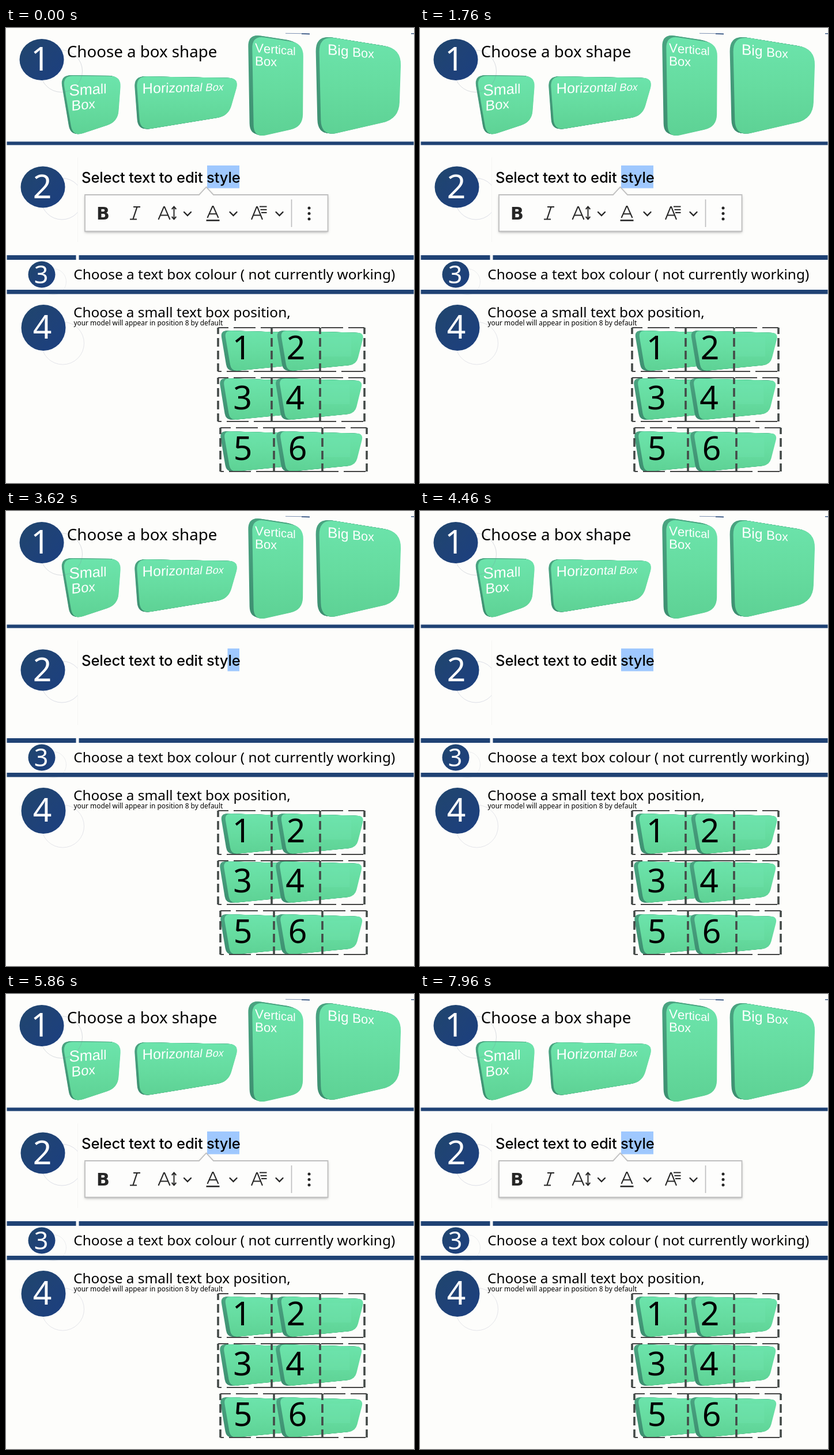
Write an HTML page with a canvas that moves like this. It is 708 px wide and 791 px high and loops after 8000 ms.

```html
<!DOCTYPE html>
<html lang="en">
<head>
<meta charset="utf-8">
<title>Box guide</title>
<style>
html, body { margin: 0; width: 100%; height: 100%; overflow: hidden; background: #fdfdfb; }
canvas { display: block; width: 708px; height: 791px; }
</style>
</head>
<body>
<canvas id="stage" width="708" height="791"></canvas>
<script>
const ctx = document.getElementById('stage').getContext('2d');
const LOOP = 8000;
const SANS = '"Noto Sans", "Open Sans", sans-serif';
const ARIAL = '"Liberation Sans", Arial, sans-serif';
const UI = 'Inter, sans-serif';
const HEAVY = '"DejaVu Sans", sans-serif';
const INK = '#262626';
const NAVY = '#1f4274';

// Editor timeline in ms
const TOOLBAR_OFF = 2600;
const TOOLBAR_ON = 5580;
const SELECT_START = 3440;
const SELECT_STEP = 160;

function text(str, x, y, size, { font = SANS, color = '#000', align = 'left', weight = 400, spacing = 0 } = {}) {
  ctx.font = `${weight} ${size}px ${font}`;
  ctx.letterSpacing = spacing + 'px';
  ctx.textAlign = align;
  ctx.fillStyle = color;
  ctx.fillText(str, x, y);
  ctx.letterSpacing = '0px';
}

function rect(x, y, w, h, color) {
  ctx.fillStyle = color;
  ctx.fillRect(x, y, w, h);
}

function line(points, color, width, cap = 'butt') {
  ctx.beginPath();
  points.forEach(([x, y]) => ctx.lineTo(x, y));
  ctx.strokeStyle = color;
  ctx.lineWidth = width;
  ctx.lineCap = cap;
  ctx.lineJoin = 'miter';
  ctx.stroke();
}

function dot(x, y, r) {
  ctx.beginPath();
  ctx.arc(x, y, r, 0, 7);
  ctx.fillStyle = INK;
  ctx.fill();
}

// Closed polygon with softened corners
function roundPoly(points, radius) {
  const n = points.length;
  ctx.beginPath();
  points.forEach((p, i) => {
    const a = points[(i + n - 1) % n], b = points[(i + 1) % n];
    const toward = q => {
      const k = radius / Math.hypot(q[0] - p[0], q[1] - p[1]);
      return [p[0] + (q[0] - p[0]) * k, p[1] + (q[1] - p[1]) * k];
    };
    ctx.lineTo(...toward(a));
    ctx.quadraticCurveTo(...p, ...toward(b));
  });
  ctx.closePath();
}

function solidBox(points, radius, dx, dy) {
  const ys = points.map(p => p[1]);
  const top = Math.min(...ys), bottom = Math.max(...ys);
  const side = ctx.createLinearGradient(0, top, 0, bottom);
  side.addColorStop(0, '#4aa481');
  side.addColorStop(1, '#3d8e70');
  for (let k = 1; k > 0; k -= 0.125) {
    roundPoly(points.map(([x, y]) => [x + dx * k, y + dy * k]), radius);
    ctx.fillStyle = side;
    ctx.fill();
  }
  const face = ctx.createLinearGradient(0, top, 0, bottom);
  face.addColorStop(0, '#6ce4ac');
  face.addColorStop(0.5, '#66dca0');
  face.addColorStop(1, '#5dd194');
  roundPoly(points, radius);
  ctx.fillStyle = face;
  ctx.fill();
}

// Letters shrink from one size to another along a sloped baseline
function receding(str, x, y, from, to, slope, skew = 0) {
  [...str].forEach((ch, i) => {
    const k = i / (str.length - 1);
    const size = from + (to - from) * k;
    ctx.save();
    ctx.transform(1, slope, skew * k, 1, x, y);
    text(ch, 0, 0, size, { font: ARIAL, color: '#fff' });
    const w = ctx.measureText(ch).width;
    ctx.restore();
    x += w;
    y += w * slope;
  });
}

function ring(x, y, r, color = '#d3d6e0') {
  ctx.beginPath();
  ctx.arc(x, y, r, 0, 7);
  ctx.strokeStyle = color;
  ctx.lineWidth = 0.8;
  ctx.stroke();
}

function badge(n, x, y, rx, ry, size, baseline, tx) {
  const g = ctx.createLinearGradient(x - rx, y - ry, x + rx, y + ry);
  g.addColorStop(0, '#20466c');
  g.addColorStop(0.5, '#1f4277');
  g.addColorStop(1, '#1b3f80');
  ctx.beginPath();
  ctx.ellipse(x, y, rx, ry, 0, 0, 7);
  ctx.fillStyle = g;
  ctx.fill();
  text(n, tx, baseline, size, { color: '#fff', align: 'center' });
}

function shapes() {
  text('Choose a box shape', 105.8, 51, 27.7);
  solidBox([[98, 83], [200, 84], [194, 163], [116, 189]], 19, -4, -1);
  receding('Small', 109.5, 118, 27.5, 23, -0.07);
  receding('Box', 113.5, 144, 25, 22.5, -0.12);

  solidBox([[226, 84], [405, 87], [386, 153], [233, 178]], 19, -4, 0);
  receding('Horizontal Box', 236.5, 114, 25.5, 17.5, -0.04, -0.22);

  solidBox([[427, 13], [516, 27], [515, 172], [430, 191]], 22, -7, -3);
  receding('Vertical', 432, 42, 22.5, 19.5, 0.075);
  receding('Box', 432, 65, 22.5, 21.5, 0.04);

  solidBox([[543, 13], [686, 36], [682, 158], [547, 189]], 29, -6, -1);
  receding('Big Box', 558, 46, 26, 21, 0.08);

  ring(96, 75, 36.5, 'rgba(120,130,150,.35)');
  badge('1', 62, 55, 38.5, 36, 57, 74, 59.5);

  line([[485, 9.3], [527, 9.8]], '#8093b4', 1);
  line([[513, 10.2], [527, 10.6]], NAVY, 1.3);
  line([[703, 9.8], [708, 9.8]], NAVY, 1.3);
}

function chevron(x) {
  line([[x - 6, 320], [x, 326], [x + 6, 320]], INK, 2.4, 'round');
}

function letterA(x, top, height, half = 10) {
  const bar = top + height * 0.66;
  line([[x - half, top + height], [x - 0.6, top], [x + 0.6, top], [x + half, top + height]], INK, 2);
  line([[x - half * 0.65, bar], [x + half * 0.65, bar]], INK, 2);
}

function toolbar() {
  ctx.save();
  ctx.beginPath();
  [[137, 290], [335, 290], [347.5, 276.5], [360, 290], [558.5, 290], [558.5, 353.5], [137, 353.5]]
    .forEach(p => ctx.lineTo(...p));
  ctx.closePath();
  ctx.shadowColor = 'rgba(0,0,0,.28)';
  ctx.shadowBlur = 4;
  ctx.shadowOffsetY = 2;
  ctx.fillStyle = '#fdfdfc';
  ctx.fill();
  ctx.shadowColor = 'transparent';
  ctx.strokeStyle = '#bfbfbf';
  ctx.lineWidth = 1.8;
  ctx.stroke();
  ctx.restore();

  text('B', 168.5, 333, 30, { font: HEAVY, color: INK, align: 'center', weight: 700 });

  line([[227.5, 311], [220.5, 332]], INK, 2.2);
  line([[221, 311], [233, 311]], INK, 2);
  line([[215, 332.5], [227, 332.5]], INK, 2);

  letterA(274.5, 311, 22);
  line([[291.5, 312], [291.5, 331]], INK, 2);
  line([[287.7, 315], [291.5, 310.5], [295.3, 315]], INK, 2);
  line([[287.7, 328], [291.5, 332.5], [295.3, 328]], INK, 2);
  chevron(315);

  letterA(359, 310, 20, 9.5);
  line([[347.5, 334.5], [370.5, 334.5]], INK, 2.6);
  chevron(394.5);

  letterA(435.5, 311, 22, 9.5);
  [310.5, 315.8, 321].forEach((y, i) => line([[440 + i * 1.5, y], [452.5, y]], INK, 2));
  chevron(474.5);

  line([[495.5, 298], [495.5, 346]], '#bdbdbd', 1.6);
  [313, 322.5, 332].forEach(y => dot(526, y, 2.5));
}

function editor(t) {
  ctx.save();
  ctx.beginPath();
  ctx.rect(0, 205, 124, 190);
  ctx.clip();
  ring(97, 297, 36);
  ctx.restore();
  badge('2', 64, 276.5, 38.5, 36, 57, 296, 63);
  line([[124.5, 225], [124.5, 372]], '#f5f5f4', 1);

  const full = t < TOOLBAR_OFF || t >= TOOLBAR_ON;
  const dragged = Math.floor((t - SELECT_START) / SELECT_STEP) + 1;
  const count = full ? 5 : Math.max(0, Math.min(5, dragged));
  const starts = [405, 391, 384.5, 371.5, 361.5, 349];
  if (count) rect(starts[count], 239, 405 - starts[count], 39.5, '#9fc8fe');
  text('Select text to edit style', 131, 269, 25.6, { font: UI, weight: 450, spacing: -0.15 });
  if (full) toolbar();
}

function colour() {
  ring(82, 441, 22.5, '#e6e7ea');
  badge('3', 62, 428.5, 23.5, 23, 43, 444, 61);
  text('Choose a text box colour ( not currently working)', 117.3, 437, 24.4);
}

function dashedFrame(x0, y0, x1, y1, shift) {
  ctx.save();
  ctx.setLineDash([38, 9]);
  ctx.lineDashOffset = shift;
  line([[x0, y0], [x1, y0]], '#444', 1.8);
  ctx.lineDashOffset = shift + 12;
  line([[x0, y1], [x1, y1]], '#444', 1.8);
  ctx.setLineDash([15, 7]);
  ctx.lineDashOffset = 4;
  line([[x0, y0], [x0, y1]], '#444a48', 3.6);
  line([[x1, y0], [x1, y1]], '#444a48', 3.6);
  ctx.restore();
}

function slotRow(dx, top, height, frameX, frameTop, frameBottom, labels, centers, baseline) {
  const bottom = top + height;
  [0, 97].forEach(step => {
    const x = dx + step;
    solidBox([
      [379 + x, top - 1], [525 + x, top + 3], [511 + x, bottom - 10], [391 + x, bottom + 2]
    ], 12, -7, 0);
  });
  rect(547 + dx, top + 10, 52, 34, 'rgba(112,226,174,.35)');
  dashedFrame(frameX, frameTop, frameX + 177, frameBottom, 20);
  dashedFrame(frameX + 93, frameTop, frameX + 254, frameBottom, 8);
  labels.forEach((s, i) => text(s, centers[i], baseline, 57, { align: 'center' }));
}

function positions() {
  ring(98.5, 548, 37, '#dcdee4');
  badge('4', 65, 521, 38.5, 40, 57, 540, 63);
  text('Choose a small text box position,', 117, 503, 24.4);
  text('your model will appear in position 8 by default', 117.5, 517, 11.9);
  slotRow(0, 527, 68, 368, 521, 597, ['1', '2'], [409, 503], 576);
  slotRow(-2.5, 610, 70, 368, 608, 684, ['3', '4'], [410.5, 501.5], 663);
  slotRow(-1.5, 702, 68, 372, 695, 771, ['5', '6'], [411, 506], 751);
}

function dividers() {
  rect(1.5, 197.5, 706, 6, NAVY);
  rect(1.5, 395, 120, 8, NAVY);
  rect(126.5, 395, 581, 8, NAVY);
  rect(1.5, 455, 706, 7.5, NAVY);
}

function draw() {
  const t = performance.now() % LOOP;
  rect(0, 0, 708, 791, '#fdfdfb');
  shapes();
  editor(t);
  colour();
  positions();
  dividers();
  requestAnimationFrame(draw);
}
draw();
</script>
</body>
</html>
```
